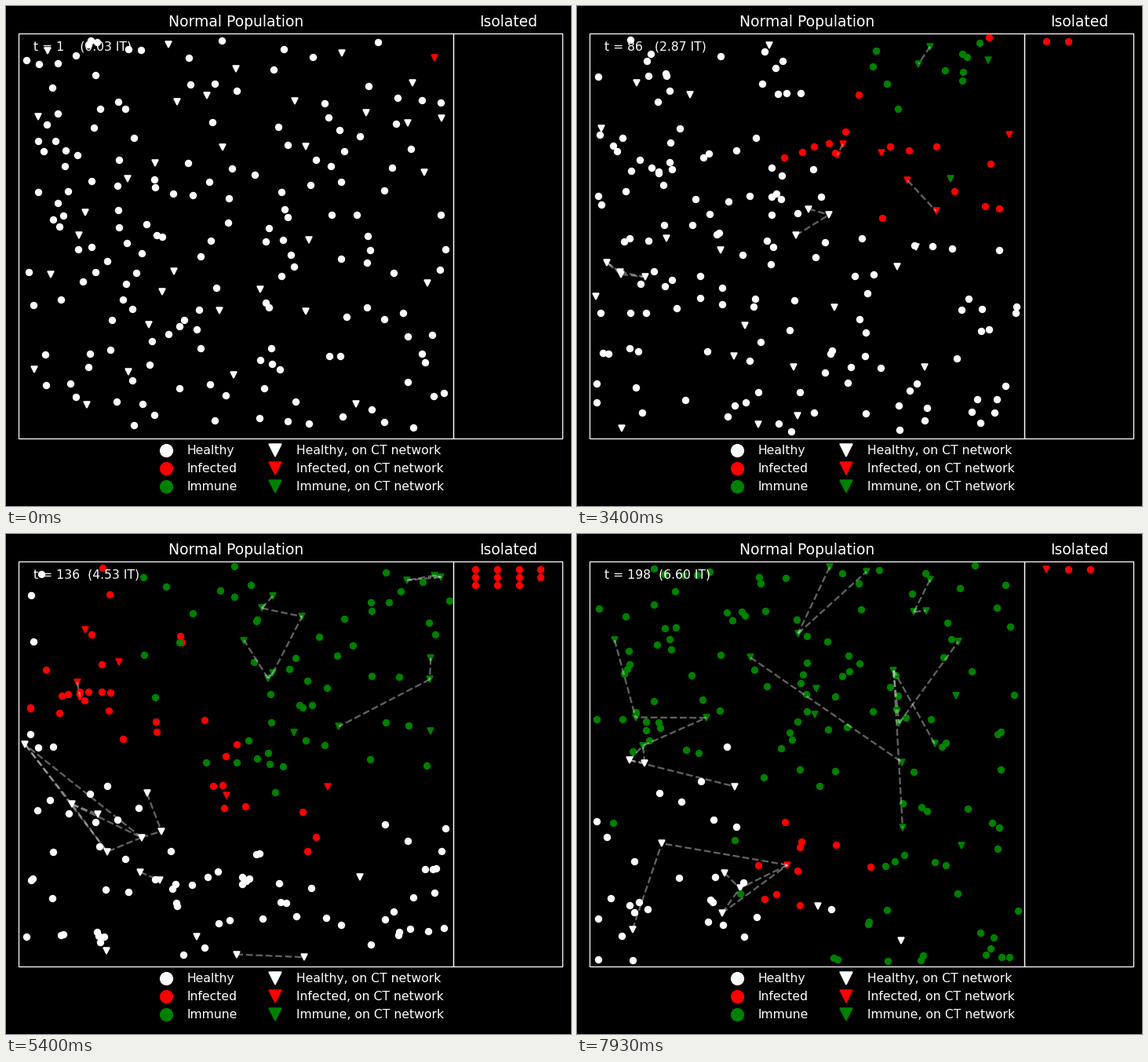
Animation of 720 by 637 pixels, one loop 8000 ms. Source, as a matplotlib script:

```python
import math

import numpy as np
import matplotlib.pyplot as plt
from matplotlib.animation import FuncAnimation
from matplotlib.collections import LineCollection

W, H = 720, 637
FRAMES, LOOP = 120, 8000
LAST, ILL = 200, 30            # simulated steps, steps an infection lasts
PEOPLE, USERS = 200, 34        # the first USERS people run the app
TRACING, MEMORY, REACH = 72, 60, 29
LO, HI = np.array([23, 40]), np.array([565, 544])
ORIGIN = np.array([546, 66])   # where the outbreak starts
STRETCH = np.array([1, 1.5])   # the disease spreads slower downwards
PT = 1.125                     # points at 112.5 dpi, expressed at 100 dpi


def total_cases(t):
    return int(170 / (1 + math.exp((118 - t) / 26)))


def ward_size(t):
    return round(11 * math.exp(-((t - 144) / 42) ** 2))


def scatter_people(rng):
    """Random places, each the roomier of two candidates."""
    pts = [ORIGIN]
    while len(pts) < PEOPLE:
        pair = rng.uniform(LO, HI, (2, 2))
        room = [np.min(np.hypot(*(np.array(pts) - c).T)) for c in pair]
        pts.append(pair[int(np.argmax(room))])
    return np.array(pts, float)


def heading(rng):
    angle = rng.uniform(0, 2 * math.pi, PEOPLE)
    speed = rng.uniform(1.2, 3.2, PEOPLE)
    return np.column_stack([np.cos(angle), np.sin(angle)]) * speed[:, None]


def walk(pos, vel, rng):
    turn = rng.random(PEOPLE) < 1 / 25
    vel[turn] = heading(rng)[turn]
    pos += vel
    vel[(pos < LO) | (pos > HI)] *= -1
    pos[:] = np.where(pos < LO, 2 * LO - pos, pos)
    pos[:] = np.where(pos > HI, 2 * HI - pos, pos)


def distances(a, b):
    gap = a[:, None] - b[None]
    return np.hypot(gap[..., 0], gap[..., 1])


def infect(pos, born, ward, t):
    """Healthy people close to someone contagious and to the origin fall ill."""
    place = pos * STRETCH
    while np.isfinite(born).sum() < total_cases(t):
        active = np.isfinite(born) & (t - born < ILL)
        active[ward] = False
        well = np.flatnonzero(np.isinf(born))
        near = distances(place[well], place[active]).min(axis=1)
        far = distances(place[well], ORIGIN[None] * STRETCH)[:, 0]
        born[well[np.argmin(near + 0.25 * far)]] = t


def isolate(born, ward, t):
    """Later on, app users are found first."""
    age = t - born
    ward[:] = [i for i in ward if age[i] < ILL]
    pool = [i for i in range(PEOPLE) if 10 < age[i] < ILL and i not in ward]
    if t < 138:
        pool = [i for i in pool if i >= USERS]
    pool.sort(key=lambda i: (i >= USERS, age[i]))
    ward += pool[:max(0, ward_size(t) - len(ward))]


def trace(pos, seen, t):
    users = pos[:USERS]
    for i, j in np.argwhere(distances(users, users) < REACH):
        if i < j:
            seen[i, j] = t


def simulate():
    rng = np.random.default_rng(11)
    pos, vel = scatter_people(rng), heading(rng)
    born = np.full(PEOPLE, np.inf)
    born[0] = 1
    ward, seen, days = [], {}, {}
    for t in range(1, LAST + 1):
        if t > 1:
            walk(pos, vel, rng)
        isolate(born, ward, t)
        infect(pos, born, ward, t)
        if t >= TRACING:
            trace(pos, seen, t)
        shown = pos.copy()
        for k, i in enumerate(ward):
            shown[i] = 598.3 + 27.7 * (k % 4), 44.6 + 10.1 * (k // 4)
        state = np.where(np.isinf(born), 0, np.where(t - born < ILL, 1, 2))
        links = [(shown[i], shown[j]) for (i, j), when in seen.items()
                 if t - when <= MEMORY and not {i, j} & set(ward)]
        days[t] = shown, state, links
    return days


DAYS = simulate()

fig = plt.figure(figsize=(W / 100, H / 100), dpi=100, facecolor="black")
ax = fig.add_axes([0, 0, 1, 1])
ax.set_xlim(0, W)
ax.set_ylim(H, 0)
ax.axis("off")


def label(x, y, text, size=10, ha="left"):
    return ax.text(x, y, text, color="white", fontsize=size * PT, ha=ha,
                   va="baseline", family="DejaVu Sans", zorder=5)


def dots(x, y, marker, color, size):
    return ax.plot(x, y, marker, color=color, ms=size * PT, mew=PT,
                   zorder=2)[0]


def room(left, right, title):
    ax.add_patch(plt.Rectangle((left, 35), right - left, 516, fill=False,
                               ec="white", lw=0.8 * PT))
    label((left + right + 1) / 2, 25.6, title, 12, "center")


room(16, 570, "Normal Population")
room(570, 709, "Isolated")

COLORS = "white", "red", "green"
for row, name in enumerate(("Healthy", "Infected", "Immune")):
    y = 566 + 22.8 * row
    dots([204], [y], "o", COLORS[row], 10)
    dots([342.5], [y], "v", COLORS[row], 10)
    label(231, y + 5.5, name)
    label(369.7, y + 5.5, name + ", on CT network")

groups = [(dots([], [], mark, color, 5), s, mark == "v")
          for s, color in enumerate(COLORS) for mark in "ov"]
network = LineCollection([], colors="white", alpha=0.38, linestyles="--",
                         linewidths=1.5 * PT, zorder=3)
ax.add_collection(network)
clock = label(35, 56.4, "")
on_app = np.arange(PEOPLE) < USERS


def draw(i):
    t = 1 + math.ceil(5 * i / 3)
    pos, state, links = DAYS[t]
    for line, s, app in groups:
        line.set_data(*pos[(state == s) & (on_app == app)].T)
    network.set_segments(links)
    clock.set_text(f"t = {t:<4} ({t / ILL:.2f} IT)")
    return [g[0] for g in groups] + [network, clock]


anim = FuncAnimation(fig, draw, frames=FRAMES, interval=LOOP / FRAMES,
                     repeat=True, repeat_delay=0)
plt.show()
```
